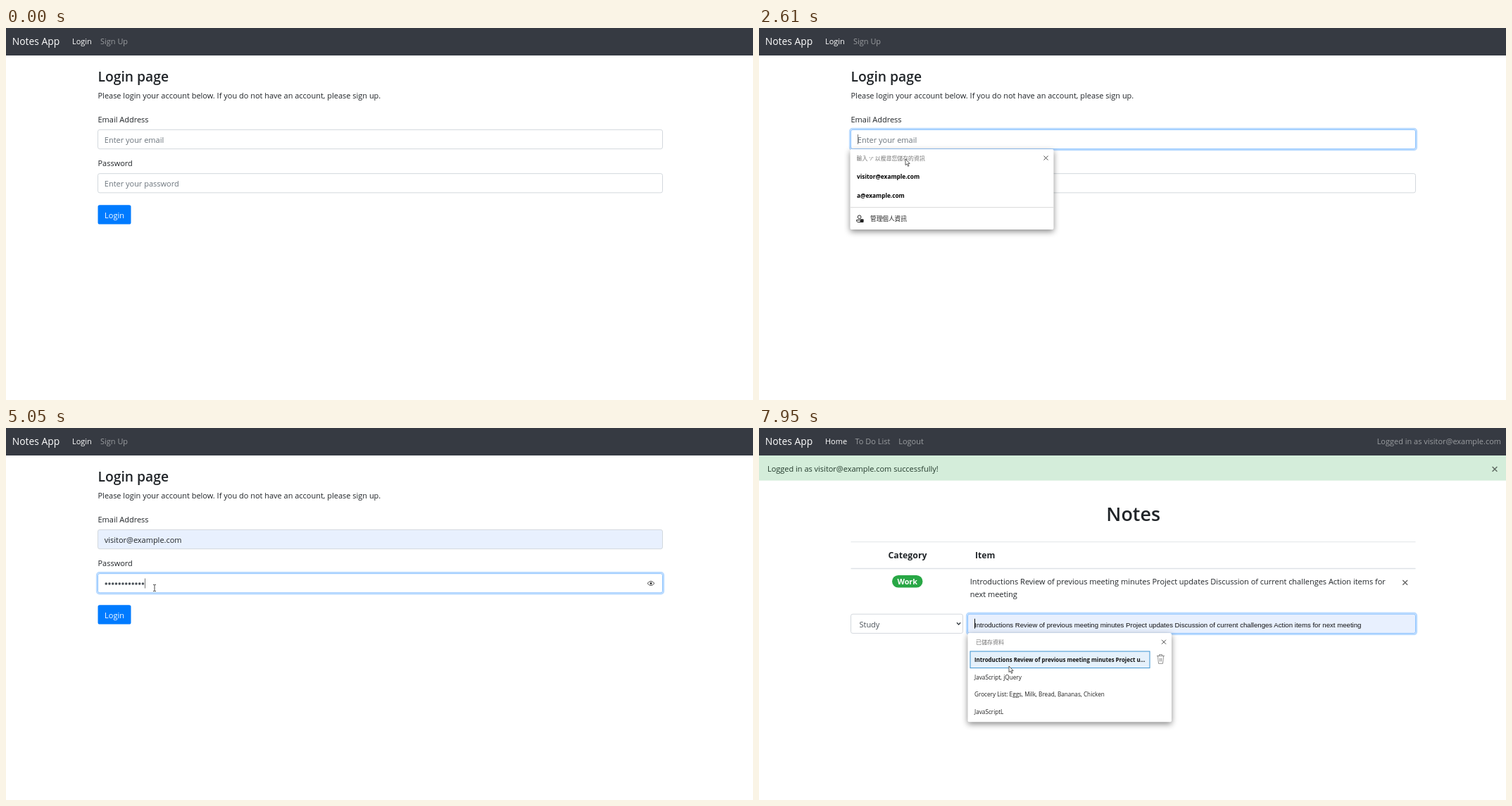
An HTML page for the animation above (8 s loop, 1061 by 528 pixels).

```html
<!DOCTYPE html>
<html lang="en">
<head>
<meta charset="utf-8">
<title>Notes App</title>
<style>
  html, body { margin: 0; width: 100%; height: 100%; overflow: hidden; background: #fff; }
  svg { display: block; width: 100vw; height: 100vh; }
  text { font: 10.98px "Open Sans", "Noto Sans CJK TC", "Noto Sans CJK", sans-serif; white-space: pre; }
</style>
</head>
<body>
<svg id="stage" viewBox="0 0 1061 528"></svg>
<script>
const LOOP = 8000;
const EMAIL = 'visitor@example.com';
const OTHER_EMAIL = 'a@example.com';
const NOTE_START = 'Introductions Review of previous meeting minutes Project u';
const NOTE_LINE = NOTE_START + 'pdates Discussion of current challenges Action items for';
const INK = '#212529', MUTED = '#6c757d', BLUE = '#007bff', AUTOFILL = '#e8f0fe';
const LEFT = 130.5, RIGHT = 932.5, ROW = 62.25;
const PREVIEW_FONT = `style="font:9.63px 'Liberation Sans',sans-serif"`;

// time, x, y, pointer shape used from that time on
const POINTER = [
  [250, 420, 2, 'arrow'], [880, 150, 22, 'hand'], [1030, 141, 22, 'hand'],
  [1100, 141, 22, 'hand'], [1160, 119, 20, 'hand'], [1230, 119, 20, 'hand'],
  [1420, 108, 19, 'hand'], [1750, 108, 19, 'arrow'], [2080, 203, 152, 'ibeam'],
  [2140, 205, 158, 'ibeam'], [2410, 206, 162, 'arrow'], [2610, 208, 186, 'arrow'],
  [2670, 208, 186, 'arrow'], [2880, 211, 211, 'arrow'], [3070, 211, 211, 'ibeam'],
  [3340, 211, 211, 'ibeam'], [3420, 211, 223, 'ibeam'], [3730, 211, 223, 'none'],
  [5050, 211, 227, 'ibeam'], [5390, 211, 227, 'arrow'], [5850, 211, 227, 'arrow'],
  [6170, 214, 272, 'arrow'], [6300, 214, 272, 'arrow'], [6630, 205, 318, 'arrow'],
  [7020, 193, 346, 'arrow'], [7220, 193, 346, 'arrow'], [7420, 345, 279, 'ibeam'],
  [7480, 355, 278, 'ibeam'], [7680, 355, 278, 'arrow'], [7940, 355, 338, 'arrow']
];
const CLICKS = [970, 1560, 2280, 3000, 3360, 6110, 7010, 7550];
const KEYSTROKES = [3730, 3790, 3860, 4000, 4140, 4240, 4330, 4590, 4660, 4720, 4920, 5050];

const text = (x, y, str, fill = INK, attrs = '') =>
  `<text x="${x}" y="${y}" fill="${fill}" ${attrs}>${str}</text>`;
const sized = (size, weight = 400) => `style="font-size:${size}px;font-weight:${weight}"`;
const rect = (x, y, w, h, fill, attrs = '') =>
  `<rect x="${x}" y="${y}" width="${w}" height="${h}" fill="${fill}" ${attrs}/>`;
const path = (d, stroke, width = 1, fill = 'none') =>
  `<path d="${d}" stroke="${stroke}" stroke-width="${width}" fill="${fill}"/>`;
const cross = (x, y, r, stroke, width) =>
  path(`M${x - r} ${y - r}l${2 * r} ${2 * r}m0 ${-2 * r}l${-2 * r} ${2 * r}`, stroke, width);
const caret = (x, y, color) => path(`M${x} ${y - 7}v14`, color, 1);

function box(x, y, w, focused, fill = '#fff') {
  const ring = focused
    ? rect(x - 1.5, y - 1.5, w + 3, 30.2, 'none', 'rx="3.6" stroke="#007bff" stroke-opacity=".27" stroke-width="2.3"')
    : '';
  return ring + rect(x, y, w, 27.2, fill, `rx="2.6" stroke="${focused ? '#80bdff' : '#ced4da'}" stroke-width=".9"`);
}

function button(x, y, w, label) {
  return rect(x, y, w, 27.4, BLUE, 'rx="2.6"') +
    text(x + w / 2, y + 18.6, label, '#fff', 'text-anchor="middle"');
}

function navbar(links, active, hovered, status = '') {
  const shade = i => i === active ? '#fff' : i === hovered ? '#cccecf' : '#9a9da0';
  return rect(0, 0, 1061, 39, '#363a42') +
    text(8.7, 24, 'Notes App', '#fff', sized(13.9)) +
    links.map(([x, label], i) => text(x, 23.2, label, shade(i))).join('') +
    text(1054, 23.2, status, '#9a9da0', 'text-anchor="end"');
}

function popup(x, y, w, h) {
  return rect(x, y, w, h, '#fff', 'rx="2" style="filter:drop-shadow(0 3px 4px #0007)"');
}

function field(row, label, placeholder, { focused, value, fill, attrs } = {}) {
  const y = 144.4 + ROW * row;
  return text(LEFT, 134.2 + ROW * row, label) +
    box(LEFT, y, RIGHT - LEFT, focused, fill) +
    text(139.8, y + 18.2, value ?? placeholder, value === undefined ? MUTED : INK, attrs);
}

const intro = (title, line) =>
  text(LEFT, 76.3, title, INK, sized(19.3, 600)) + text(LEFT, 99.7, line);

function emailPopup(t) {
  const hover = t >= 2750 ? rect(131, 198, 286, 25, '#e5f1fb', 'stroke="#4a9ad4" stroke-width=".8"') : '';
  return popup(129.5, 172, 289, 114) + hover +
    text(138.5, 187.5, "輸入 '/' 以搜尋您儲存的資訊", '#767676', sized(7.9)) +
    cross(407.5, 184.5, 3, '#333', 0.9) +
    text(139, 213.8, EMAIL, '#000', sized(8.3, 700)) +
    text(139, 241, OTHER_EMAIL, '#000', sized(8.3, 700)) +
    path('M129.5 254.7h289', '#d8d8d8', 1) +
    '<circle cx="142.6" cy="268.3" r="2.4" fill="none" stroke="#222"/>' +
    path('M144 275.5h-3.5q-2 0-2-3h5', '#222', 1) +
    rect(143.6, 271.3, 5, 4.6, '#222', 'rx="1"') +
    text(158, 274.2, '管理個人資訊', '#222', sized(8.65));
}

function passwordDots(t) {
  const count = KEYSTROKES.filter(k => k <= t).length;
  let dots = '';
  for (let i = 0; i < count; i++) dots += `<circle cx="${142.2 + i * 4.75}" cy="221" r="1.75" fill="#495057"/>`;
  if (count) dots += path('M911 220.5q5-6 10 0q-5 6-10 0z', '#333', 0.9) + '<circle cx="916" cy="220.5" r="1.5" fill="#333"/>';
  return dots + caret(140.5 + count * 4.75, 220.5, '#777');
}

function loginPage(t) {
  const onEmail = t >= 2280 && t < 3420;
  const onPassword = t >= 3420;
  const email = { focused: onEmail };
  if (t >= 2750) Object.assign(email, { value: EMAIL, fill: AUTOFILL });
  if (t < 3070) email.attrs = email.value && PREVIEW_FONT;
  const password = { focused: onPassword };
  if (t >= KEYSTROKES[0]) password.value = '';
  return navbar([[94, 'Login'], [134, 'Sign Up']], 0, t > 850 && t < 1100 ? 1 : -1) +
    intro('Login page', 'Please login your account below. If you do not have an account, please sign up.') +
    field(0, 'Email Address', 'Enter your email', email) +
    field(1, 'Password', 'Enter your password', password) +
    button(130.5, 251.2, 47, 'Login') +
    (onEmail && t < 3070 ? caret(140.5, 158, '#777') : '') +
    (onPassword ? passwordDots(t) : '') +
    (t >= 2410 && t < 3070 ? emailPopup(t) : '');
}

function signUpPage() {
  const fields = [
    ['Email Address', 'Enter your email'], ['First Name', 'Enter your first name'],
    ['Last Name', 'Enter your last name'], ['Password', 'Enter your password'],
    ['Confirm your Password', 'Confirm your password']
  ];
  return navbar([[94, 'Login'], [134, 'Sign Up']], 1, 0) +
    intro('Sign Up page', 'Please sign up in the below form if you are a new user. If you already have an account, please login.') +
    fields.map(([label, hint], row) => field(row, label, hint)).join('') +
    button(130.5, 449.8, 54.5, 'Submit');
}

function categoryPopup(pointerY) {
  const options = ['Select a category', 'Personal', 'Work', 'Study', 'Shopping', 'Other'];
  const height = 17.2, top = 292;
  const hovered = Math.max(0, Math.floor((pointerY - top) / height));
  return popup(LEFT, top, 159, height * options.length) +
    options.map((label, i) =>
      (i === hovered ? rect(LEFT, top + i * height, 159, height, '#cfd4da') : '') +
      text(142.5, top + 12.6 + i * height, label, '#495057')).join('');
}

function notePopup(hovering) {
  const trash = path('M565 323.5h11m-9.5 0l1 10.8h6l1-10.8m-6 0v-2h4v2m-3 3v5m2-5v5', '#777', 0.8);
  return popup(296.5, 291, 289.5, 126.3) +
    text(308, 306.8, '已儲存資料', '#767676', sized(8)) +
    cross(575, 303.7, 3, '#333', 0.9) +
    (hovering ? rect(300, 317, 255, 23.6, '#e5f1fb', 'stroke="#3d94d1" stroke-width="1"') + trash : '') +
    text(306, 332.2, NOTE_START + '...', '#111', hovering ? sized(7.9, 700) : sized(8.2)) +
    ['JavaScript, jQuery', 'Grocery List: Eggs, Milk, Bread, Bananas, Chicken', 'JavaScriptL']
      .map((label, i) => text(306, 356.8 + i * 24.6, label, '#222', sized(8.2))).join('');
}

function notesPage(t, pointerY) {
  const selecting = t >= 6240 && t < 7085;
  const onSelect = t >= 6240 && t < 7550;
  const onNote = t >= 7550;
  const hovering = t >= 7880;
  const note = hovering
    ? text(306, 282.6, NOTE_LINE + ' next meeting', '#111', PREVIEW_FONT)
    : text(306, 282.6, 'Note...', MUTED);
  return navbar([[94, 'Home'], [136.5, 'To Do List'], [198.3, 'Logout']], 0, -1, 'Logged in as ' + EMAIL) +
    rect(0, 39, 1061, 35.6, '#d4edda') +
    text(12, 61.6, `Logged in as ${EMAIL} successfully!`, '#243b2d') +
    cross(1045, 58.3, 3.4, '#5d6860', 1.4) +
    text(531.7, 132.2, 'Notes', INK, 'text-anchor="middle" ' + sized(26.9, 600)) +
    path('M130.5 161.7h802', '#dee2e6', 0.9) +
    path('M130.5 199.6h802', '#dee2e6', 1.5) +
    text(211, 185.2, 'Category', INK, 'text-anchor="middle" ' + sized(12.3, 700)) +
    text(307, 185.2, 'Item', INK, sized(12.1, 700)) +
    rect(189, 209, 43.5, 17.6, '#28a745', 'rx="8.8"') +
    text(210.7, 222, 'Work', '#fff', 'text-anchor="middle" ' + sized(10.8, 700)) +
    text(299.8, 222.2, NOTE_LINE) +
    text(299.8, 239.8, 'next meeting') +
    cross(917.7, 219.4, 3.4, '#666', 1.4) +
    box(LEFT, 264.2, 159, onSelect) +
    text(142.5, 282.6, t < 7085 ? 'Select a category' : 'Study', '#495057') +
    path('M281 276.3l2.6 2.7 2.6-2.7', '#343a40', 1.3) +
    box(296.5, 264.2, RIGHT - 296.5, onNote, hovering ? AUTOFILL : '#fff') +
    note +
    (onNote ? caret(306.5, 277.7, '#111') : '') +
    button(498, 308.7, 67.5, 'Add Note') +
    (selecting ? categoryPopup(pointerY) : '') +
    (t >= 7680 ? notePopup(hovering) : '');
}

function pointerAt(t) {
  const i = POINTER.findLastIndex(key => key[0] <= t);
  if (i < 0) return { x: 0, y: 0, shape: 'none' };
  const [start, x, y, shape] = POINTER[i];
  const [end, nextX, nextY] = POINTER[i + 1] ?? [LOOP, x, y];
  const u = (t - start) / (end - start);
  const eased = u * u * (3 - 2 * u);
  return { x: x + (nextX - x) * eased, y: y + (nextY - y) * eased, shape };
}

const SHAPES = {
  none: '',
  arrow: path('M0 0V8.6L2 6.9 3.6 10.3 5 9.6 3.5 6.4H6.2Z', '#333', 0.8, '#fff'),
  hand: path('M-1 1Q0-.6 1 1V4.2L4.6 5.2Q5.4 5.6 5.2 7L4.3 11H-.2L-2.8 7.2Q-2.8 6-1 7Z', '#222', 0.7, '#fff'),
  ibeam: path('M-2-4.6h1.4L0-4 .6-4.6H2M0-4V4M-2 4.6h1.4L0 4l.6.6H2', '#333', 0.9)
};

function scene(t) {
  const { x, y, shape } = pointerAt(t);
  const page = t < 1100 || t >= 1690 && t < 5390 ? loginPage(t)
    : t < 1690 ? signUpPage() : notesPage(t, y);
  const clicked = CLICKS.some(c => t >= c && t < c + 130);
  const glow = clicked ? '<circle r="8.5" fill="#ffeb00" fill-opacity=".62"/>' : '';
  return page + `<g transform="translate(${x.toFixed(2)} ${y.toFixed(2)})">${glow}${SHAPES[shape]}</g>`;
}

const stage = document.getElementById('stage');
const startTime = performance.now();
let shown = '';
function draw() {
  const markup = scene((performance.now() - startTime) % LOOP);
  if (markup !== shown) stage.innerHTML = shown = markup;
  requestAnimationFrame(draw);
}
draw();
</script>
</body>
</html>
```
